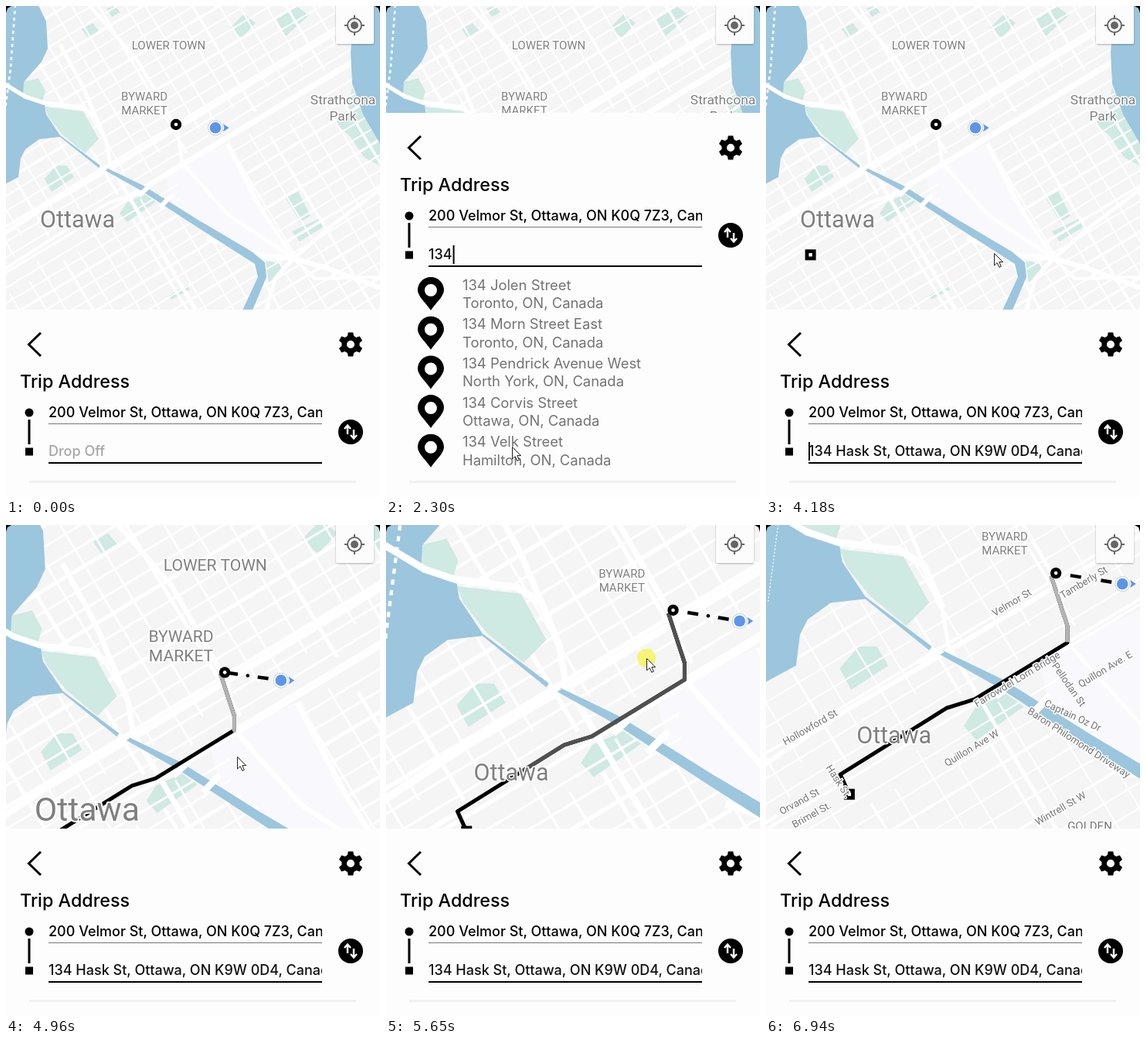
Animation, 484 px wide and 634 px high, one loop 7 s. Source, as an HTML page:

```html
<!DOCTYPE html>
<html lang="en">
<head>
<meta charset="utf-8">
<title>Trip address</title>
<style>
  html, body { margin: 0; width: 100%; height: 100%; overflow: hidden; background: #fdfdfd; }
  svg { display: block; width: 484px; height: 634px; }
  text { white-space: pre; }
  #roads { --k: 1; fill: none; stroke: #fff; }
  #roads path { stroke-width: calc(var(--w) * var(--k)); stroke-linejoin: round; }
  #labels, #streets { font-family: Roboto, sans-serif; fill: #808080; text-anchor: middle;
    stroke: #fff; stroke-width: 3px; stroke-linejoin: round; paint-order: stroke; }
  #streets { font-size: 13px; fill: #757575; }
  #panel, #list { font-family: Inter, sans-serif; font-weight: 500; font-size: 18px; }
  #list { font-size: 18.4px; font-weight: 400; fill: #737373; }
</style>
</head>
<body>
<svg viewBox="0 0 484 634">
  <defs>
    <clipPath id="field"><rect x="50" y="0" width="359" height="260"/></clipPath>
    <filter id="soft" x="-20%" y="-20%" width="140%" height="140%">
      <feDropShadow dx="0" dy="1" stdDeviation="1.2" flood-opacity=".3"/>
    </filter>
  </defs>
  <rect width="484" height="634" fill="#f5f5f6"/>

  <g id="map">
    <path fill="#f9f8fc" d="M205 215L290 175L345 285L372 325L335 335L215 255Z"/>
    <g id="parks" fill="#cfe9e3">
      <path d="M98 30L112 22L120 32L106 41Z"/>
      <path d="M130 3L141 0L148 8L137 14Z"/>
      <path d="M290 28L308 10L323 22L305 41Z"/>
      <path d="M350 17L373 -2L392 12L362 39Z"/>
      <path d="M50 223L65 206L79 206L88 221L59 240Z"/>
      <path d="M147 268L156 254L180 243L194 253L157 279Z"/>
      <path d="M362 248L378 239L394 271L381 279Z"/>
      <path d="M370 291L405 275L411 285L380 304Z"/>
      <path d="M211 374L235 360L238 366L214 379Z"/>
      <path d="M336 328L358 334L350 349L340 357Z"/>
      <path d="M420 146L441 136L448 105L462 140L484 178V206L464 196L445 168Z"/>
    </g>
    <g id="roads"></g>
    <path fill="#cfe9e3" d="M50 130L100 136L120 172L102 190L73 166L55 143Z"/>
    <g fill="#9cc6de">
      <path d="M-12 -5H40L52 20L54 55L46 72L24 97L22 118L50 128L52 140L70 167L122 206L120 209L70 169L43 172L25 185L19 197L16 221L-12 236Z"/>
      <path d="M452 -5L446 60L448 100L462 140L484 178V-5Z"/>
      <path d="M128 208L178 232L250 277L318 317L335 331L337 350L318 395H305L326 350L322 333L248 286L176 239L126 211Z"/>
    </g>
    <path fill="#cfe9e3" d="M23 98L42 93L51 110L47 124L22 119Z"/>
    <g fill="none" stroke="#fff">
      <path stroke-width="5.5" d="M-10 96L25 117L49 125L97 131L116 143L130 176"/>
      <path stroke-width="6" d="M112 219L130 208M172 245L188 230M199 260L215 244"/>
      <path id="ferry" stroke-width="2.6" stroke-dasharray="4 4.5" d="M12 -2L6 80L-6 172"/>
    </g>
  </g>

  <g id="route" fill="none" stroke="#000" stroke-width="5" stroke-linejoin="round">
    <path id="line"/>
    <path id="glow" pathLength="1"/>
    <path id="dashes" stroke-width="4.5"/>
    <circle id="dot" r="2.3" fill="#000" stroke="none"/>
  </g>
  <g id="start"><circle r="7.2"/><circle r="2.3" fill="#fff"/></g>
  <g id="end"><path d="M-7 -7H7V7H-7Z"/><path fill="#fff" d="M-2.2 -2.2H2.2V2.2H-2.2Z"/></g>
  <g id="me">
    <circle r="9.5" fill="#fff" stroke="#c9ced6"/>
    <circle r="7.3" fill="#5b95e9"/>
    <path fill="#5b95e9" d="M10 -5L17.5 0L10 5L11.5 0Z"/>
  </g>
  <g id="labels"></g>
  <g id="streets"></g>

  <rect x="427" y="-4" width="49" height="53" rx="2" fill="#fcfcfc" filter="url(#soft)"/>
  <g fill="none" stroke="#666" stroke-width="2" transform="translate(451 25)">
    <circle r="9"/><circle r="5" fill="#666" stroke="none"/>
    <path d="M0 -13V-9M0 9V13M-13 0H-9M9 0H13"/>
  </g>
  <path d="M0 0H7L2 3L0 9ZM484 0H477L482 3L484 9Z"/>

  <g id="panel">
    <rect width="484" height="500" fill="#fdfdfd"/>
    <path d="M45 30L29.5 45L45 60" fill="none" stroke="#000" stroke-width="3"/>
    <g id="gear" transform="translate(446 45)"></g>
    <text x="18" y="101" font-size="23.3">Trip Address</text>
    <circle cx="30" cy="133" r="5.5"/>
    <path d="M28.5 142H31.5V174H28.5ZM25 178.5H35V188.5H25Z"/>
    <g clip-path="url(#field)">
      <text x="55" y="139">200 Velmor St, Ottawa, ON K0Q 7Z3, Canada</text>
      <text id="typed" x="55" y="189"></text>
    </g>
    <path d="M55 147.5H409" stroke="#777" stroke-width="1.2"/>
    <path d="M55 198H409" stroke="#000" stroke-width="2.2"/>
    <path id="under" stroke="#333"/>
    <rect id="caret" y="171" width="2" height="24"/>
    <g transform="translate(446 158)">
      <circle r="16"/>
      <path fill="none" stroke="#fff" stroke-width="2.4" d="M-4 3V-8M-8 -4L-4 -8.5L0 -4M4 -3V8M0 4L4 8.5L8 4"/>
    </g>
  </g>
  <g id="list"></g>
  <path d="M30 614.5H453" stroke="#f1f1f1" stroke-width="3"/>

  <g id="cursor">
    <circle id="press" r="12" fill="#f6f34a" fill-opacity=".75"/>
    <path fill="#fff" stroke="#222" d="M.5 .5V16L4.2 12.6L6.8 18.4L9.3 17.3L6.8 11.6H11.6Z"/>
  </g>
</svg>

<script>
const $ = id => document.getElementById(id);
const NS = 'http://www.w3.org/2000/svg';
const LOOP = 7000;

function add(parent, tag, attrs, text) {
  const el = document.createElementNS(NS, tag);
  for (const k in attrs) el.setAttribute(k, attrs[k]);
  if (text) el.textContent = text;
  parent.append(el);
  return el;
}
const put = (el, attrs) => { for (const k in attrs) el.setAttribute(k, attrs[k]); };
const show = (el, on) => el.setAttribute('visibility', on ? 'visible' : 'hidden');
const clamp = v => Math.max(0, Math.min(1, v));
const smooth = v => { v = clamp(v); return v * v * (3 - 2 * v); };

// Latest [time, value] entry at t
const latest = (steps, t) => steps.filter(s => s[0] <= t).pop();

// Linear track through [time, ...values]
function track(keys, t) {
  let i = 0;
  while (i < keys.length - 2 && t >= keys[i + 1][0]) i++;
  const [a, b] = [keys[i], keys[i + 1]];
  const f = clamp((t - a[0]) / (b[0] - a[0]));
  return a.slice(1).map((v, j) => v + (b[j + 1] - v) * f);
}

// Map
const road = (parent, w, d) => add(parent, 'path', { d, style: `--w:${w}px` });
const grid = add($('roads'), 'g', { transform: 'translate(240 200) rotate(-31)' });
for (let i = -22; i <= 22; i++) {
  road(grid, i % 3 ? 2 : 3.4, `M-400 ${i * 17}H400`);
  const x = i * 26 + (i % 2) * 4;
  road(grid, i % 4 ? 2 : 3.4, `M${x} -400V-${i % 2 ? 30 : 12}M${x} ${i % 3 ? 25 : 8}V400`);
}
add($('roads'), 'path', { d: 'M222 212L286 180L340 282L368 322L338 330L226 258Z', fill: '#f9f8fc', stroke: 'none' });
[
  [6, 'M-10 299L58 254L146 203L287 118L430 32'],
  [5, 'M70 50L100 105L130 176L135 205L182 285L250 400'],
  [4.5, 'M104 -5L170 70L222 160L228 203L290 272L372 325'],
  [5, 'M286 178L330 262L372 325'],
  [6, 'M260 300L330 322L372 326L420 340L490 366'],
  [5, 'M335 400L348 352L372 326L420 285L490 232'],
  [4, 'M372 326L400 352L490 350'],
  [4, 'M-10 345L133 254L156 247L228 203L330 142L490 45']
].forEach(r => road($('roads'), ...r));

for (let a = 0; a < 360; a += 60) add($('gear'), 'path', { d: 'M-4.5 -9L-3.2 -15.5H3.2L4.5 -9Z', transform: `rotate(${a})` });
add($('gear'), 'circle', { r: 8.3, fill: 'none', stroke: '#000', 'stroke-width': 6.5 });

const labels = [
  ['LOWER TOWN', 210.5, 51, 15],
  ['BYWARD|MARKET', 179, 125.5, 15],
  ['Ottawa', 92.5, 275, 30.5],
  ['Strathcona|Park', 436, 131, 17.4]
].map(([name, x, y, size]) => {
  const el = add($('labels'), 'g', { 'font-size': size });
  const rows = name.split('|');
  rows.forEach((row, i) => add(el, 'text', { y: size * .36 + (i - (rows.length - 1) / 2) * size * 1.18 }, row));
  return { el, x, y };
});
[
  ['Velmor St', 318, 100, -31], ['Tamberly St', 411, 74, -31],
  ['Hollowford St', 57, 261, -30], ['Quillon Ave W', 266, 288, -31],
  ['Quillon Ave. E', 439, 186, -31], ['Farrowdel Lorn Bridge', 325, 199, -31],
  ['Pellodan St', 392, 206, 55], ['Captain Oz Dr', 397, 246, 25],
  ['Baron Philomond Driveway', 405, 281, 33], ['Orvand St', 43, 357, -29],
  ['Brimel St.', 59, 374, -29], ['Hask St.', 94, 331, 57], ['Wintrell St W', 381, 366, -30]
].forEach(([name, x, y, a]) => add($('streets'), 'text', { transform: `translate(${x} ${y}) rotate(${a})`, y: 4.5 }, name));
add($('streets'), 'text', { x: 419, y: 394, 'font-size': 15 }, 'GOLDEN');

// Suggestions
const T = 'Toronto, ON, Canada', O = 'Ottawa, ON, Canada';
const sets = [
  [],
  ['100 Morn Street West', T, '14 Velk Street', T, '1448 Pendrick Avenue East', 'North York, ON, Canada',
    '181 Corvis Street East', T, '101 Jolen Street', T],
  ['13 Velk Street', T, '130 Morn Street West', T, '1300 Pendrick Avenue East', T,
    '133 Jolen Street', T, '135 Corvis Street East', T],
  ['134 Jolen Street', T, '134 Morn Street East', T, '134 Pendrick Avenue West', 'North York, ON, Canada',
    '134 Corvis Street', O, '134 Velk Street', 'Hamilton, ON, Canada'],
  ['134 Hask Street', O, '134 Haskside Drive', 'Kitchener, ON, Canada', '134 Haskfield Crescent', 'Hamilton, ON, Canada',
    '134 Haske Crescent', 'Yellowknife, NT, Canada', '134 Hask Avenue', 'Winnipeg, MB, Canada']
];
const lists = sets.map(set => {
  const g = add($('list'), 'g', {});
  for (let i = 0; i < set.length; i += 2) {
    const y = 351 + i * 25.35;
    add(g, 'path', { fill: '#000', 'fill-rule': 'evenodd', transform: `translate(58 ${y + 17})`,
      d: 'M0 25C-5 17 -17 7 -17 -1A17 17 0 0 1 17 -1C17 7 5 17 0 25ZM-8 -1A8 8 0 0 0 8 -1A8 8 0 0 0 -8 -1Z' });
    add(g, 'text', { x: 99, y: y + 15.5 }, set[i]);
    add(g, 'text', { x: 99, y: y + 39 }, set[i + 1]);
  }
  return g;
});

const typing = [[0, ''], [1130, '1'], [1510, '13'], [2170, '134'], [2360, '134 '], [2630, '134 h'],
  [2750, '134 ha'], [2850, '134 has'], [2940, '134 hask'], [4060, '134 Hask St, Ottawa, ON K9W 0D4, Canada']];
const listAt = [[0, 0], [1180, 1], [1580, 2], [2300, 3], [2940, 4], [4060, 0]];
const pointer = [[70, 164, 532], [400, 112, 572], [660, 135, 569], [1960, 135, 569], [1970, 163, 569],
  [3470, 163, 569], [3860, 322, 362], [4060, 322, 362], [4180, 295, 319], [4960, 299, 299],
  [5330, 298, 284], [5650, 337, 172], [5950, 341, 124], [6230, 341, 124]];
const presses = [[480, 600], [3920, 4060], [5330, 5950]];
const drag = [[5330, 165, 133.8], [5650, 140.8, 200.7], [5950, 138.6, 229.7]];
const way = [[215.3, 151.2], [228, 190], [228, 203], [155.6, 247.2], [133.8, 254], [50.5, 305.8], [57.7, 321.5]];

function camera(t) {
  const f = smooth((t - 4441) / 840);
  const s = 1.656 ** f;
  const [cx, cy] = t < 5330 ? [242 - 77 * f, 196 - 62.2 * f] : track(drag, t);
  return { s, x: 242 - s * cx, y: 196 - s * cy };
}

function drawMap(t) {
  const cam = camera(t);
  const at = (x, y) => [x * cam.s + cam.x, y * cam.s + cam.y];
  const move = (el, p, k = 1) => put(el, { transform: `translate(${p[0]} ${p[1]}) scale(${k})` });
  const settled = t >= 6170;
  move($('map'), [cam.x, cam.y], cam.s);
  $('roads').style.setProperty('--k', settled ? .62 : 1);
  put($('ferry'), settled ? { 'stroke-width': .8, 'stroke-dasharray': '1.2 1.5' } : { 'stroke-width': 2.6, 'stroke-dasharray': '4 4.5' });
  const k = t < 5290 ? cam.s : 1;
  labels.forEach(l => move(l.el, at(l.x, l.y), k));
  show($('streets'), settled);

  const a = at(217.5, 142.5).map((v, i) => v + [2.5, 10.5][i]);
  const b = at(271, 157.3);
  move($('start'), a);
  move($('me'), b);
  move($('end'), at(57.6, 321.3));
  show($('end'), t >= 4120);

  // Route with a pale sweep that darkens as it runs
  const on = t >= 4600;
  put($('route'), { display: on ? 'inline' : 'none' });
  if (!on) return;
  const d = 'M' + way.map(p => at(...p).join(' ')).join('L');
  const p = clamp((t - 4600) % 1990 / 1000 * .75 - .07);
  const c = Math.round(194 * (1 - p ** 1.6));
  put($('line'), { d });
  put($('glow'), { d, stroke: `rgb(${c},${c},${c})`, 'stroke-dasharray': `${p} 2` });
  show($('glow'), p > 0 && p < 1);

  const len = Math.hypot(b[0] - a[0], b[1] - a[1]);
  const on2 = q => { const f = clamp(q / len); return `${a[0] + (b[0] - a[0]) * f} ${a[1] + (b[1] - a[1]) * f}`; };
  const o = 3 + (cam.s - 1.406) * 64;
  put($('dashes'), { d: [o, o + 40].map(q => `M${on2(q)}L${on2(q + 14)}`).join('') });
  put($('dot'), { transform: `translate(${on2(o + 27)})` });
  show($('dot'), !settled);
}

function drawPanel(t) {
  const up = t >= 1060 && t < 4060;
  put($('panel'), { transform: `translate(0 ${up ? 138 : 392})` });
  const [since, str] = latest(typing, t);
  const typed = $('typed');
  const text = str || 'Drop Off';
  if (typed.textContent !== text) typed.textContent = text;
  put(typed, { fill: str ? '#111' : '#a6a6a6' });
  const end = n => 55 + (n > 0 ? typed.getSubStringLength(0, n) : 0);

  const caretX = !str || t >= 4060 ? 55 : end(str.length) + 1;
  const from = str ? since : 600;
  put($('caret'), { x: caretX });
  show($('caret'), t >= from && Math.floor((t - from) / 500) % 2 === 0);

  const word = up && str.length > 4;
  show($('under'), word);
  if (word) put($('under'), { d: `M${end(4)} 193.5H${end(t < 3140 ? str.length - 1 : str.length)}` });

  const current = latest(listAt, t)[1];
  lists.forEach((g, i) => put(g, { display: i === current ? 'inline' : 'none' }));
}

function draw(t) {
  drawMap(t);
  drawPanel(t);
  const [x, y] = track(pointer, t);
  put($('cursor'), { transform: `translate(${x} ${y})`, display: t >= 70 && t < 6230 ? 'inline' : 'none' });
  show($('press'), presses.some(([a, b]) => t >= a && t < b));
}

const t0 = performance.now();
function tick() {
  draw((performance.now() - t0) % LOOP);
  requestAnimationFrame(tick);
}
tick();
</script>
</body>
</html>
```
